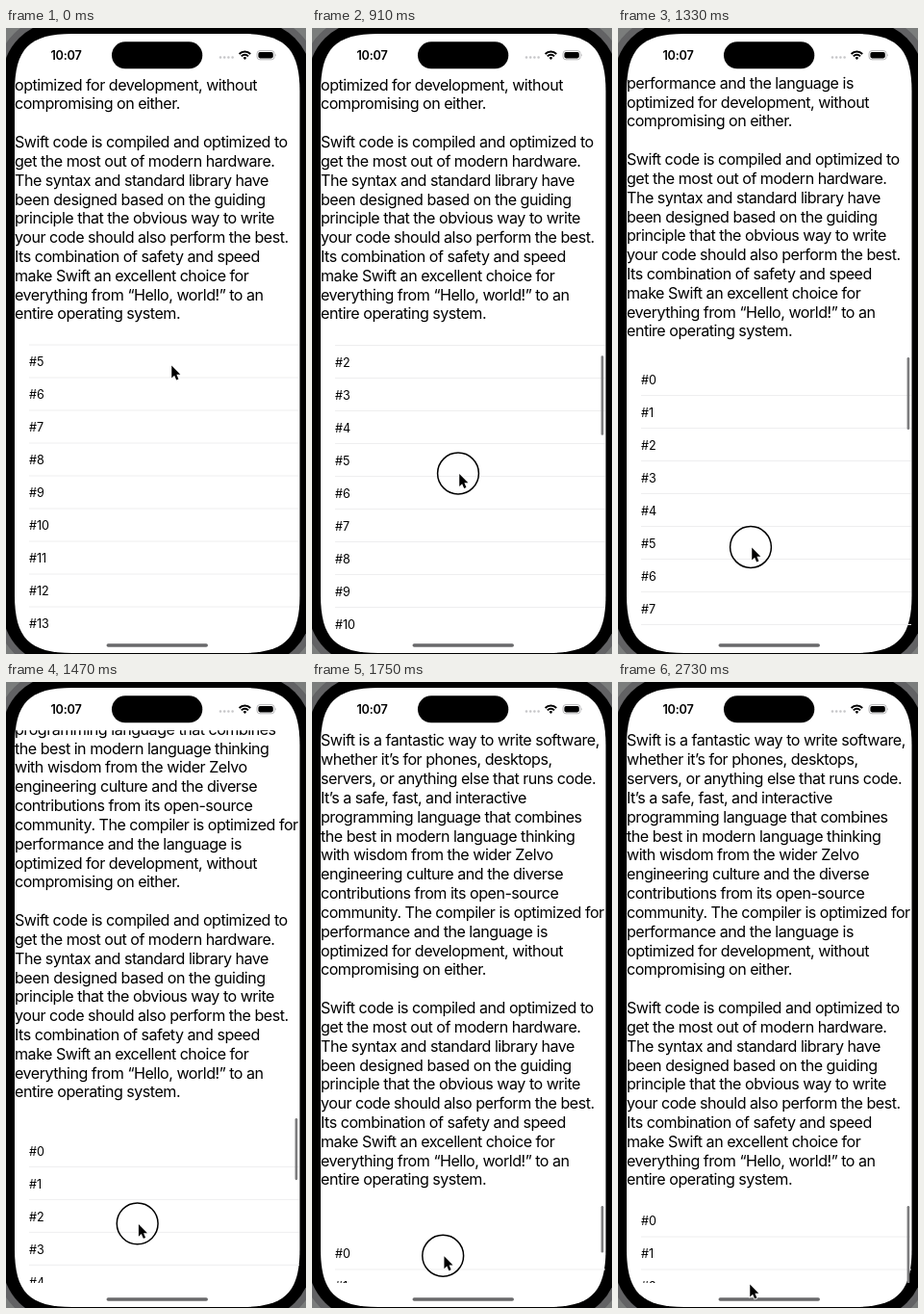
An HTML page that plays this animation: 312x650 px, repeating every 2940 ms.

```html
<!DOCTYPE html>
<html lang="en">
<head>
<meta charset="utf-8">
<title>Nested scrolling</title>
<style>
  html, body { margin: 0; width: 100%; height: 100%; overflow: hidden; background: #7b7d7c; }
  body > svg { display: block; font-family: Inter, "Liberation Sans", sans-serif; }
  #article { font-size: 16.1px; letter-spacing: -.5px; }
  #rows { font-size: 12.6px; letter-spacing: -.1px; }
  #rows line { stroke: #eeeeef; }
  #clock { font-size: 12.7px; font-weight: 600; letter-spacing: -.25px; }
</style>
</head>
<body>
<svg id="stage" width="312" height="650" viewBox="0 0 312 650">
  <rect x="-4" y="-7" width="322" height="669" rx="60" stroke="#626264" stroke-width="14"/>
  <rect x="-4" y="-7" width="322" height="669" rx="60"/>
  <path fill="#fff" d="M9 66C9 21.5 24.5 6 69 6H245.5C290 6 305.5 21.5 305.5 66V589C305.5 633.5 290 649 245.5 649H69C24.5 649 9 633.5 9 589Z"/>

  <svg x="9" y="50.3" width="296.5" height="573.7" viewBox="9 50.3 296.5 573.7">
    <g id="article"></g>
    <svg id="list" x="24" width="281" height="320"><g id="rows"></g></svg>
    <rect id="bar" x="300.6" width="2.6" rx="1.3" fill="#7c7c7e"/>
  </svg>

  <text id="clock" x="46.5" y="32.6">10:07</text>
  <rect x="110" y="14.3" width="94.3" height="28" rx="14"/>
  <path d="M223 30.5h13" stroke="#c6c6c8" stroke-width="2.6" stroke-linecap="round" stroke-dasharray="0 4.2"/>
  <g fill="none" stroke="#000" stroke-width="2">
    <path d="M242.6 27a8 8 0 0 1 11.6 0M244.8 29.4a5 5 0 0 1 7.2 0"/>
    <path d="M246.6 30.9a2.6 2.6 0 0 1 3.6 0L248.4 33Z" fill="#000" stroke="none"/>
  </g>
  <rect x="261" y="23.6" width="18.2" height="9.2" rx="3" fill="none" stroke="#a5a5a7" stroke-width=".8"/>
  <rect x="262.4" y="25" width="15.4" height="6.4" rx="1.8"/>
  <path d="M280.3 26.8q1.4 1.4 0 2.8z" fill="#a5a5a7"/>
  <rect x="104.5" y="639.2" width="105.5" height="3.6" rx="1.8" fill="#69696b"/>

  <g id="pointer">
    <circle id="ring" r="21.4" fill="none" stroke="#000" stroke-width="1.5"/>
    <path transform="translate(.8 .6) scale(.9)" d="M.5 0V14.2L3.7 11.2L6 16.6L8.5 15.5L6.2 10.3H10.6Z" stroke="#fff" stroke-width="1.6" paint-order="stroke"/>
  </g>
</svg>
<script>
const LOOP = 2940, STEP = 70, LINE = 19.83, ROW = 34;
const TEXT_SHIFT = 220, RELEASE = 2165, PULL = 48;
const $ = id => document.getElementById(id);
const set = (id, attrs) => {
  for (const name in attrs) $(id).setAttribute(name, attrs[name]);
};

const article = `Swift is a fantastic way to write software,
whether it’s for phones, desktops,
servers, or anything else that runs code.
It’s a safe, fast, and interactive
programming language that combines
the best in modern language thinking
with wisdom from the wider Zelvo
engineering culture and the diverse
contributions from its open-source
community. The compiler is optimized for
performance and the language is
optimized for development, without
compromising on either.

Swift code is compiled and optimized to
get the most out of modern hardware.
The syntax and standard library have
been designed based on the guiding
principle that the obvious way to write
your code should also perform the best.
Its combination of safety and speed
make Swift an excellent choice for
everything from “Hello, world!” to an
entire operating system.`;

$('article').innerHTML = article.split('\n')
  .map((line, i) => `<text x="9" y="${66.4 + i * LINE}">${line}</text>`).join('');
$('rows').innerHTML = Array.from({ length: 16 }, (_, i) =>
  `<text y="${23.4 + i * ROW}">#${i}</text>
   <line x2="281" y1="${35 + i * ROW}" y2="${35 + i * ROW}"/>`).join('');

// Linear interpolation through [time, value] points.
function track(points, t) {
  let i = 1;
  while (i < points.length - 1 && t > points[i][0]) i++;
  const [t0, v0] = points[i - 1], [t1, v1] = points[i];
  const u = Math.min(1, Math.max(0, (t - t0) / (t1 - t0)));
  return v0 + (v1 - v0) * u;
}

const pointerX = [[140, 171], [630, 162], [1190, 142], [1330, 138], [1540, 136], [2170, 136.6], [2730, 136]];
const pointerY = [[140, 350], [350, 368], [630, 414], [1190, 511], [1330, 539], [1540, 574], [1820, 603], [2100, 626], [2730, 625]];
const pageDrop = [[1190, 0], [1260, 3], [1330, 18], [1400, 66], [1470, 129], [1540, 185], [1610, 211], [1680, TEXT_SHIFT]];

function draw(t) {
  const x = track(pointerX, t), y = track(pointerY, t), drop = track(pageDrop, t);
  const pressed = t >= 280 && t < RELEASE;
  const scroll = Math.min(163, Math.max(0, 523 - y));
  // Rubber band while held, then a critically damped spring.
  const w = Math.max(0, t - RELEASE) * .0165;
  const over = t < RELEASE ? Math.max(0, y - 523) * .467 : PULL * (1 + w) * Math.exp(-w);

  set('article', { transform: `translate(0 ${drop - TEXT_SHIFT})` });
  set('list', { y: 321 + drop });
  set('rows', { transform: `translate(0 ${over - scroll})` });
  set('bar', { y: 324 + drop + scroll * .268, height: 82.5 - over, opacity: t >= 350 ? 1 : 0 });
  set('pointer', { transform: `translate(${x} ${y})` });
  set('ring', { opacity: pressed ? 1 : 0 });
}

const start = performance.now();
function tick() {
  const t = (performance.now() - start) % LOOP;
  draw(Math.floor(t / STEP) * STEP);
  requestAnimationFrame(tick);
}
tick();
</script>
</body>
</html>
```
